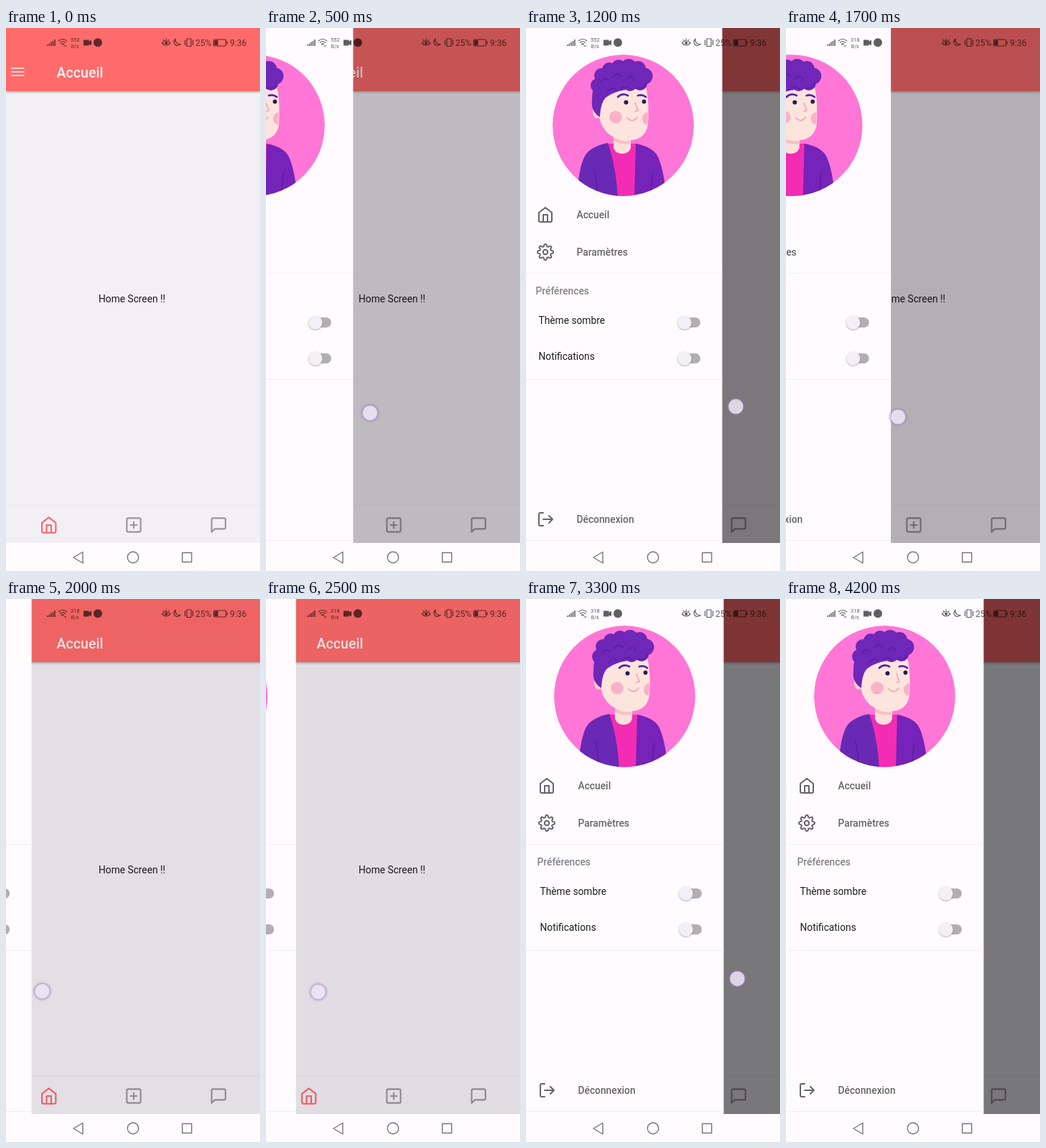
An HTML page for the animation above (4.3 s loop, 354x756 px).

```html
<!DOCTYPE html>
<html lang="fr">
<head>
<meta charset="utf-8">
<title>Drawer</title>
<style>
  html, body { margin: 0; width: 100%; height: 100%; overflow: hidden; background: #fffbff; }
  svg { display: block; font: 13.77px Roboto, sans-serif; }
  .icon { fill: none; stroke-width: 2; stroke-linecap: round; stroke-linejoin: round; }
  .item { font-weight: 500; fill: #68656a; }
</style>
</head>
<body>
<svg width="354" height="756" viewBox="0 0 354 756">
  <defs>
    <filter id="soft" x="-50%" y="-50%" width="200%" height="200%"><feGaussianBlur stdDeviation="1.3"/></filter>
    <clipPath id="disc"><circle cx="135.5" cy="135.5" r="98.5"/></clipPath>
    <g id="home"><path d="M3 9l9-7 9 7v11a2 2 0 0 1-2 2H5a2 2 0 0 1-2-2z"/><path d="M9 22V12h6v10"/></g>
    <g id="toggle">
      <rect x="215" y="-7" width="30" height="14" rx="7" fill="#b3aeb4"/>
      <circle cx="223" cy="1" r="9.8" fill="#777" opacity=".5" filter="url(#soft)"/>
      <circle cx="223" r="9.6" fill="#f3eff6"/>
    </g>
  </defs>

  <g id="screen">
    <rect width="354" height="717" fill="#f2eff5"/>
    <rect y="86" width="354" height="4" fill="#000" opacity=".2" filter="url(#soft)"/>
    <rect width="354" height="88" fill="#ff6b6b"/>
    <path d="M7.5 56.2h18M7.5 61.2h18M7.5 66.2h18" stroke="#ffe3e6" stroke-width="1.7"/>
    <text x="70.5" y="69" font-size="19.6" font-weight="500" fill="#fff0f2">Accueil</text>
    <text x="129" y="382" fill="#1c1b1e">Home Screen !!</text>
    <path d="M0 664.5h354" stroke="#e9e6ec"/>
    <g class="icon" stroke="#99959b">
      <use href="#home" transform="translate(46.9 679.2) scale(1.07)" stroke="#f9686d"/>
      <path transform="translate(165.2 679.2) scale(1.07)" d="M5 3h14a2 2 0 0 1 2 2v14a2 2 0 0 1-2 2H5a2 2 0 0 1-2-2V5a2 2 0 0 1 2-2zM12 8v8M8 12h8"/>
      <path transform="translate(283.4 679.2) scale(1.07)" d="M21 15a2 2 0 0 1-2 2H7l-4 4V5a2 2 0 0 1 2-2h14a2 2 0 0 1 2 2z"/>
    </g>
  </g>
  <rect id="scrim" width="354" height="717"/>

  <g id="drawer">
    <rect x="-30" width="305.5" height="717" fill="#fffbff"/>
    <g transform="translate(2)" clip-path="url(#disc)">
      <circle cx="135.5" cy="135.5" r="98.5" fill="#ff76d7"/>
      <path d="M113 161h42v75h-42z" fill="#f22db3"/>
      <path d="M122 145h24v22q-3 8-12 8t-12-8z" fill="#fde0da"/>
      <path d="M122 152q10 7 23 5v4q-13 2-23-4z" fill="#f8bfc4"/>
      <path d="M71 236Q74 181 88 171Q98 163 114 160Q125 190 128 236z" fill="#6929b4"/>
      <path d="M153 161Q174 165 182 176Q191 190 196 236H151z" fill="#7523b8"/>
      <path d="M99 236q0-25-5-40M174 236q0-22 3-36" fill="none" stroke="#561d9c" stroke-width="1.2"/>
      <ellipse cx="99" cy="117" rx="6" ry="9" fill="#fbd0d0"/>
      <path d="M102 96Q112 82 140 80L167 82Q172 100 170 134Q167 156 142 156.500Q109 155 102 124z" fill="#fde5de"/>
      <g id="hair" fill="#6e27b7"><path d="M92 100Q92 70 112 58L160 56 168 72 157 85Q128 84 111 97Q104 104 103 124Q90 116 92 100z"/></g>
      <path d="M104 76q5-9 11-3M121 68q7-8 12 0M140 71q8-8 11 2M113 89q8-8 13-3M133 84q8-5 14 2M154 83q10 3 14-6" fill="none" stroke="#5620a2" stroke-width="1.5" stroke-linecap="round"/>
      <path d="M128 96q6-6 14-2M156 94q6-2 11 2" fill="none" stroke="#5d22a8" stroke-width="2.8" stroke-linecap="round"/>
      <g fill="#2a1b55"><circle cx="139.500" cy="103.500" r="3"/><circle cx="164.500" cy="102.500" r="2.900"/></g>
      <g fill="#fbb1c6"><circle cx="125" cy="124" r="8.800"/><path d="M170 117q-8 2-8 9t7 9z"/></g>
      <path d="M152 104l4 11-4 1M141 125q7 8 14-1" fill="none" stroke="#f4a0b2" stroke-width="1.5" stroke-linecap="round"/>
    </g>
    <g class="icon" stroke="#68656a">
      <use href="#home" x="17" y="248"/>
      <g id="gear" transform="translate(29 312)"><circle r="3.2"/></g>
      <path transform="translate(17 672)" d="M9 3H5a2 2 0 0 0-2 2v14a2 2 0 0 0 2 2h4M17 17l5-5-5-5M22 12H9"/>
    </g>
    <g class="item">
      <text x="72.500" y="265">Accueil</text>
      <text x="72.500" y="317">Paramètres</text>
      <text x="72.500" y="689">Déconnexion</text>
      <text x="15.500" y="371" fill="#858188">Préférences</text>
    </g>
    <g fill="#1f1e21"><text x="19.500" y="412">Thème sombre</text><text x="19.500" y="462">Notifications</text></g>
    <use href="#toggle" y="410"/><use href="#toggle" y="460"/>
    <path d="M0 341.500h275.500M0 489.500h275.500M0 713.500h275.500" stroke="#f0ecf2"/>
  </g>

  <rect y="717" width="354" height="39" fill="#fffbff"/>
  <g fill="none" stroke="#77747a" stroke-width="1.400" stroke-linejoin="round">
    <path d="M107 729.500v15.500l-13-7.750z"/><circle cx="177" cy="737" r="7.700"/><rect x="245.700" y="730.500" width="13" height="13"/>
  </g>

  <g opacity=".62" fill="none" stroke="#000" stroke-width="1.200">
    <path d="M58 25v-2M60.500 25v-3.500M63 25v-5.500M65.500 25v-7M68 25v-9" stroke-width="1.500"/>
    <path d="M73 18q6-5 12 0M75 20.500q4-3.500 8 0M77 23q2-2 4 0M80.500 25h4"/>
    <path d="M108 16.500h7.500v2l3.500-1.800v7.600l-3.500-1.800v2H108z" fill="#000" stroke="none"/>
    <circle cx="128" cy="20.300" r="6" fill="#000" stroke="none"/>
    <path d="M217.500 21q5.500-7 11.500 0q-6 6-11.500 0zM219 16l1.200 1.500M223.200 14.500v2M227.500 16l-1.200 1.500"/><circle cx="223.200" cy="20.800" r="1.500" fill="#000"/>
    <path d="M236 15.500a5 5 0 1 0 7 7a6 6 0 0 1-7-7z"/>
    <path d="M252 15h6v10.500h-6zM249.500 16.500v7.500M260.500 16.500v7.500"/>
    <rect x="289.500" y="16" width="17" height="9" rx="1.500"/><path d="M308.300 18.500v4"/><path d="M291 17.500h4v6h-4z" fill="#000"/>
    <g fill="#000" stroke="none">
      <text id="rate" x="96.300" y="18.700" font-size="7.500" text-anchor="middle">552</text>
      <text x="96.300" y="27.500" font-size="7" text-anchor="middle">B/s</text>
      <text x="264" y="24.800" font-size="12">25%</text><text x="312" y="24.800" font-size="12">9:36</text>
    </g>
  </g>

  <g id="touch">
    <circle r="12.500" fill="#9277b4" opacity=".4" filter="url(#soft)"/>
    <circle r="10.500" fill="#f6f1fa" fill-opacity=".78" stroke="#a68ec8" stroke-opacity=".55"/>
  </g>
</svg>
<script>
const $ = id => document.getElementById(id);
const LOOP = 4300, WIDTH = 275.5, PEAK = 273.5;

function add(parent, tag, attrs) {
  const node = document.createElementNS('http://www.w3.org/2000/svg', tag);
  for (const key in attrs) node.setAttribute(key, attrs[key]);
  parent.append(node);
}

// Curls around the head
[[100, 80, 10], [105, 66, 10], [116, 58, 10], [129, 54, 10], [143, 54, 11], [156, 57, 11],
 [165, 67, 11.5], [159, 77, 10], [145, 78, 10]]
  .forEach(([cx, cy, r]) => add($('hair'), 'circle', { cx, cy, r }));

// Eight rounded teeth
const teeth = Array.from({ length: 97 }, (_, i) => {
  const a = i / 96 * 2 * Math.PI, r = 9.5 + 1.5 * Math.tanh(2 * Math.cos(8 * a));
  return (r * Math.cos(a)).toFixed(2) + ' ' + (r * Math.sin(a)).toFixed(2);
});
add($('gear'), 'path', { d: 'M' + teeth.join('L') + 'z' });

const phase = (t, from, to) => Math.min(1, Math.max(0, (t - from) / (to - from)));
const easeInOut = p => (1 - Math.cos(Math.PI * p)) / 2;

// Right edge of the drawer: pulled open, pushed back, pulled open again
function edge(t) {
  if (t < 1200) return PEAK * Math.sin(Math.PI / 2 * phase(t, 210, 1200));
  if (t < 2280) return PEAK * (1 - easeInOut(phase(t, 1200, 2246)));
  return WIDTH * easeInOut(phase(t, 2322, 3021));
}

// Finger: time, distance from the edge, height
const finger = [[200, 20, 540], [500, 23.5, 536], [1200, 19, 527], [1700, 10, 541.5],
                [2250, 19, 550], [2500, 31, 547], [2800, 24.5, 537.5], [3100, 19, 530], [3400, 19, 528]];

function fingerAt(t) {
  const i = finger.findIndex(key => key[0] > t), a = finger[i - 1], b = finger[i];
  const p = phase(t, a[0], b[0]);
  return [edge(t) + a[1] + (b[1] - a[1]) * p, a[2] + (b[2] - a[2]) * p];
}

function draw(now) {
  const t = Math.floor(now % LOOP / 100) * 100; // ten pictures a second
  const x = edge(t), touching = t >= 200 && t < 3400;
  $('drawer').setAttribute('transform', `translate(${x - WIDTH})`);
  $('drawer').style.display = x > 0 ? '' : 'none';
  $('scrim').setAttribute('opacity', 0.5 * x / WIDTH);
  $('rate').textContent = t < 1500 ? '552' : '318';
  $('touch').style.display = touching ? '' : 'none';
  if (touching) $('touch').setAttribute('transform', `translate(${fingerAt(t)})`);
}

const start = performance.now();
(function tick() {
  draw(performance.now() - start);
  requestAnimationFrame(tick);
})();
</script>
</body>
</html>
```
